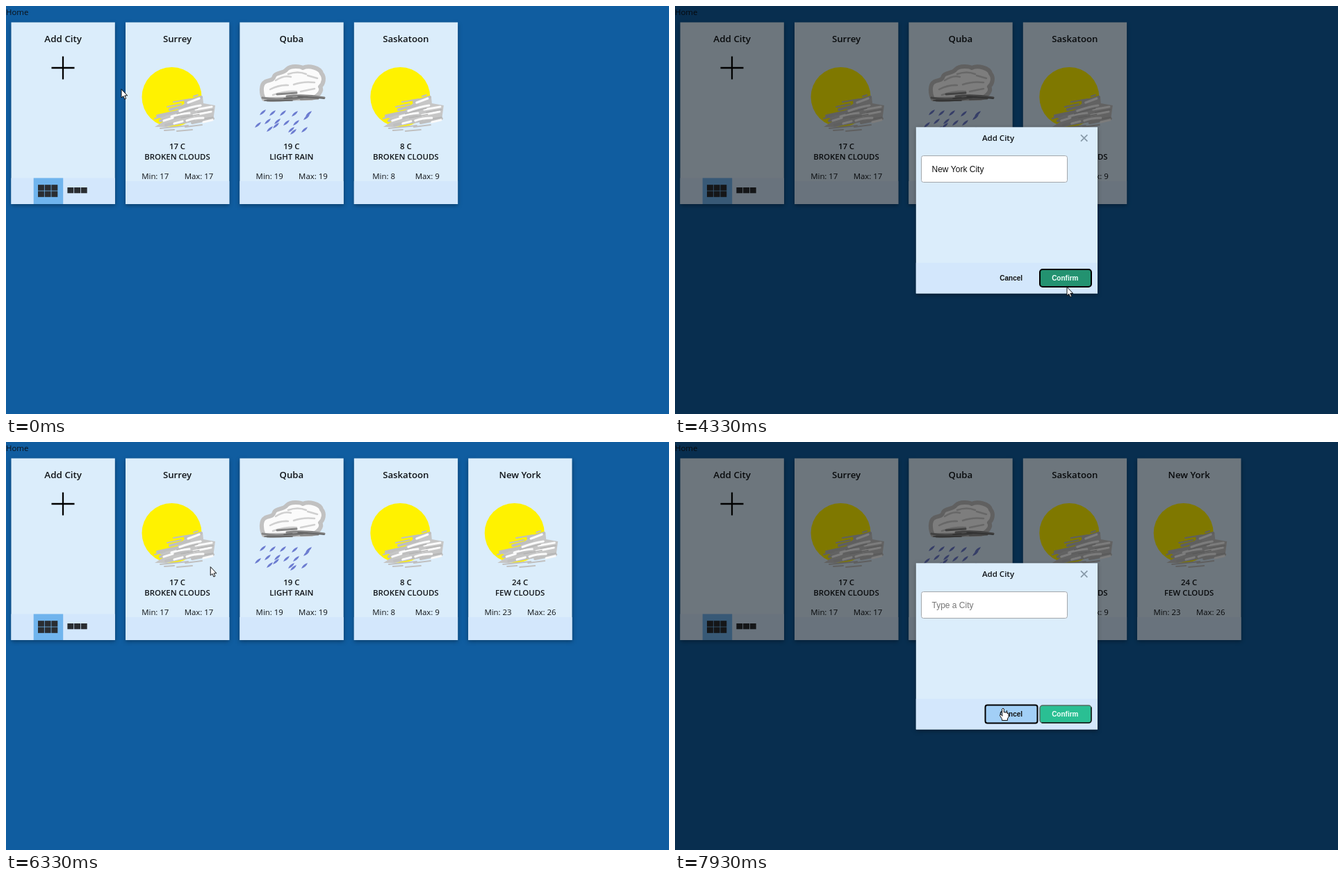
These frames come from a looping animation (954 px wide and 587 px high, 8000 ms). An HTML page with a canvas:

```html
<!DOCTYPE html>
<html lang="en">
<head>
<meta charset="utf-8">
<title>Weather cards</title>
<style>
  html, body { margin: 0; height: 100%; overflow: hidden; background: #105da0; }
  canvas { display: block; }
</style>
</head>
<body>
<canvas id="stage" width="954" height="587"></canvas>
<script>
const ctx = document.getElementById('stage').getContext('2d');
const TICKS = 120, TICKS_PER_MS = 15 / 1000;
const UI = '"Open Sans", "Noto Sans", sans-serif';
const ARIAL = '"Liberation Sans", Arial, sans-serif';
const PANEL = '#dbedfb', FOOTER = '#d3e7fc', HOVER = '#a2cff6';

const PLUS = [58.5, 69.5, 47, 41];
const INPUT = [354.5, 215.5, 210, 38];
const CANCEL = [446.5, 378.5, 75, 26];
const CONFIRM = [525, 379, 74, 25];
const ROW_HEIGHT = 28.75;

const cities = [
  { name: 'Surrey', temp: 17, sky: 'BROKEN CLOUDS', min: 17, max: 17 },
  { name: 'Quba', temp: 19, sky: 'LIGHT RAIN', min: 19, max: 19 },
  { name: 'Saskatoon', temp: 8, sky: 'BROKEN CLOUDS', min: 8, max: 9 },
  { name: 'New York', temp: 24, sky: 'FEW CLOUDS', min: 23, max: 26 },
];

// Pointer waypoints: tick, x, y
const route = [
  [1, 166, 120], [8, 95, 92], [12, 95, 92], [17, 372, 262], [20, 436, 243],
  [51, 436, 243], [54, 438, 268], [55, 438, 268], [60, 563, 402], [64, 563, 402],
  [65, 564, 404.6], [74, 400, 300], [81, 400, 300], [88, 103, 76], [90, 103, 76],
  [94, 300, 177], [98, 263, 196], [102, 263, 196], [110, 96, 91], [113, 96, 91],
  [118, 472, 383], [120, 472, 383],
];

// Typed text by tick
const typing = [
  [0, ''], [28, 'n'], [31, 'ne'], [33, 'new '], [36, 'new y'], [37, 'new yo'],
  [41, 'new yor'], [44, 'new york'], [55, 'New York City'], [66, ''],
];

// Suggestions by tick
const suggestions = [
  [0, []],
  [29, ['Nanchang', 'Nairobi', 'Nagoya', 'Naples']],
  [31, ['Neuquen', 'New Delhi', 'Newcastle', 'Netanya']],
  [33, ['New Delhi', 'Newcastle', 'New Orleans', 'New York City']],
  [36, ['New Yekepa', 'New York City']],
  [37, ['New York City']],
  [55, []],
];

const during = (tick, ...spans) => spans.some(([from, to]) => tick >= from && tick < to);
const latest = (list, tick) => list.filter(([from]) => tick >= from).pop()[1];
const inside = ([px, py], [x, y, w, h]) => px >= x && px <= x + w && py >= y && py <= y + h;

function pointerAt(tick) {
  const next = route.findIndex(([at]) => at > tick);
  if (next === 0) return route[0].slice(1);
  const [t0, x0, y0] = route[next - 1], [t1, x1, y1] = route[next];
  const p = (tick - t0) / (t1 - t0), ease = p * p * (3 - 2 * p);
  return [x0 + (x1 - x0) * ease, y0 + (y1 - y0) * ease];
}

function rect(x, y, w, h, color) {
  ctx.fillStyle = color;
  ctx.fillRect(x, y, w, h);
}

function box([x, y, w, h], radius, fill, line, width = 1) {
  ctx.beginPath();
  ctx.roundRect(x, y, w, h, radius);
  if (fill) { ctx.fillStyle = fill; ctx.fill(); }
  if (line) { ctx.strokeStyle = line; ctx.lineWidth = width; ctx.stroke(); }
}

function text(str, x, y, font, color = '#101418', align = 'center') {
  ctx.font = font;
  ctx.fillStyle = color;
  ctx.textAlign = align;
  ctx.fillText(str, x, y);
}

function stroke(path, color, width, cap = 'round') {
  ctx.strokeStyle = color;
  ctx.lineWidth = width;
  ctx.lineCap = cap;
  ctx.lineJoin = 'round';
  ctx.stroke(new Path2D(path));
}

function fill(path, color) {
  ctx.fillStyle = color;
  ctx.fill(new Path2D(path));
}

function panel(x, y, w, h, footerHeight) {
  ctx.save();
  ctx.shadowColor = 'rgba(0,0,0,.35)';
  ctx.shadowBlur = 6;
  ctx.shadowOffsetY = 2;
  rect(x, y, w, h, PANEL);
  ctx.restore();
  rect(x, y + h - footerHeight, w, footerHeight, FOOTER);
}

function sunIcon() {
  ctx.beginPath();
  ctx.arc(238.5, 131, 43, 0, 7);
  ctx.fillStyle = '#fff200';
  ctx.fill();
  fill('M218 159L246 150L262 135L283 130L284 140L301 143L298 165L268 167L230 174L214 174L228 165Z', '#c6c6c6');
  stroke('M218 158l28-6M236 149l28-7M258 138l23-7M222 165l40-8M230 171l40-7M268 168l30-6', '#bfbfbf', 4);
  stroke('M214 162l14-4M232 145l20-4M241 138l24-4M222 176l40-4M228 179l14-1M246 180l22-2M258 174l24-3M270 130l6-2', '#c0c0c0', 2);
  stroke('M250 151q16-6 30-8M262 139l16-6M273 149l23-4M238 159q12-4 26-5M270 157l25-5M260 165q10-4 24-4M284 167l13-3M227 165l13-4M242 169l12-3', '#fafafa', 3.2);
  stroke('M246 155l30-8M276 153l22-4M252 161l26-5M286 162l12-2', '#b4b4b4', 1.5);
}

function rainIcon() {
  const cloud = 'M371 134C367 126 366 113 373 109C379 106 384 108 386 101C388 95 399 98 404 91C410 85 424 87 427 89C436 85 452 89 454 97C459 103 457 112 452 116C456 122 449 130 440 133Z';
  fill(cloud, '#fbfbfb');
  stroke(cloud, '#c1c1c1', 6);
  stroke('M388 107q12-8 22-5M406 98q14-5 26 0M434 100l14 4M380 120q14-7 26-6M414 113q14-5 30-3M384 128q18-6 34-5M424 123l20-4', '#d0d0d0', 2.5);
  stroke('M369 132q20 4 42 0M376 136q26 1 50-4M404 130q26-3 54 2M390 127l28-2M424 134l25-1', '#858585', 3);
  stroke('M372 136l40 0M420 130l38 3M400 133l34-2', '#606060', 1.5);
  const drops = [
    [370, 153], [384, 154], [399, 154], [416, 155], [436, 155], [433, 160], [363, 171],
    [377, 166], [391, 166], [404, 168], [418, 168], [380, 177], [389, 172], [411, 178], [414, 181], [430, 178],
  ];
  for (const [x, y] of drops)
    fill(`M${x - 5} ${y + 4}Q${x - 3} ${y - 2} ${x + 4} ${y - 4}Q${x + 2} ${y + 2} ${x - 5} ${y + 4}Z`, '#6c7cd0');
}

function cityCard(city, index) {
  const shift = index * 164.4, center = 246.5 + shift;
  panel(172 + shift, 23.5, 149.3, 261.5, 33);
  text(city.name, center, 52, `600 13.2px ${UI}`);
  ctx.save();
  if (city.sky === 'LIGHT RAIN') {
    rainIcon();
  } else {
    ctx.translate(shift, 0);
    sunIcon();
  }
  ctx.restore();
  text(`${city.temp} C`, center, 206, `600 11.4px ${UI}`);
  text(city.sky, center, 221, `600 11.4px ${UI}`);
  text(`Min: ${city.min}`, center - 31.7, 249, `11.4px ${UI}`);
  text(`Max: ${city.max}`, center + 31, 249, `11.4px ${UI}`);
}

function addCard(hover, focus) {
  panel(7.5, 23.5, 149.3, 261.5, 37.5);
  text('Add City', 82.2, 52, `600 13.4px ${UI}`);
  if (hover) box(PLUS, 3, HOVER);
  if (focus) box(PLUS, 3, null, '#000', 2);
  stroke('M65.5 89H98.5M82 72.5V105.5', '#000', 2.3, 'butt');
  rect(39.7, 247.5, 42.5, 37.5, '#70b4ed');
  for (let col = 0; col < 3; col++) {
    for (const y of [257.2, 266.4]) rect(46 + col * 9.7, y, 8.9, 8.4, '#2a2d31');
    rect(88.4 + col * 9.7, 261, 8.9, 8.3, '#2a2d31');
  }
}

function dialog(tick, pointer, focus) {
  rect(0, 0, 954, 587, 'rgba(0,0,0,.5)');
  panel(346.8, 174.3, 261.2, 239.2, 44);
  text('Add City', 465, 194.3, `600 11.5px ${UI}`);
  stroke('M584 185.3l9.4 9.4M593.4 185.3l-9.4 9.4', '#8799a8', 1.7, 'butt');

  const value = latest(typing, tick), rows = latest(suggestions, tick);
  box(INPUT, 3, '#fff', '#a3a7ab');
  text(value || 'Type a City', 369.5, 238.5, `12px ${ARIAL}`, value ? '#111' : '#757575', 'left');
  if (during(tick, [20, 55])) {
    ctx.font = `12px ${ARIAL}`;
    rect(Math.round(369.5 + ctx.measureText(value).width), 228, 1, 13, '#000');
  }
  if (rows.length) {
    box([354.5, 254.5, 210, rows.length * ROW_HEIGHT], 0, '#fff', '#9a9ea2');
    rows.forEach((row, i) => {
      const area = [355, 255 + i * ROW_HEIGHT, 209, ROW_HEIGHT - 1];
      if (inside(pointer, area)) rect(...area, '#e9e9e9');
      text(row, 369.5, 273 + i * ROW_HEIGHT, `12px ${ARIAL}`, '#111', 'left');
    });
  }

  if (inside(pointer, CANCEL)) box(CANCEL, 3, HOVER);
  if (focus === 'cancel') box(CANCEL, 3, null, '#000', 2);
  text('Cancel', 483.7, 395, `bold 10px ${ARIAL}`, '#111');

  const active = focus === 'confirm';
  box(CONFIRM, 4, active || inside(pointer, CONFIRM) ? '#239270' : '#2abf93', active ? '#000' : '#56695f', active ? 2 : 1.4);
  if (!active) stroke('M599 382V400Q599 404 595 404H528', '#0c1d18', 1.5);
  text('Confirm', 561.3, 395, `bold 10px ${ARIAL}`, '#effffa');
}

function drawPointer([x, y], shape) {
  ctx.save();
  ctx.translate(x, y);
  if (shape === 'beam') {
    stroke('M-2.5-5.5H-.5L.5-5L1.5-5.5H3.5M.5-5V5M-2.5 5.5H-.5L.5 5L1.5 5.5H3.5', '#000', 1, 'butt');
  } else {
    const outline = shape === 'hand'
      ? 'M-1.3 1Q0-.8 1.3 1V6Q3.5 5 4 6.7Q6-.2 6 7.5Q7.8 6.5 8 9V12.5L6.5 15V17.5H-1.5V15.5L-4.6 10.5Q-4.5 8-2.5 9.5L-1.3 11Z'
      : 'M0 0V12L2.8 9.6L4.7 14L6.7 13.1L4.8 8.9H8.3Z';
    fill(outline, '#fff');
    stroke(outline, '#111', 1);
  }
  ctx.restore();
}

function draw(tick) {
  const pointer = pointerAt(tick);
  const open = during(tick, [11, 66], [90, 94], [113, TICKS]);
  const plusHover = !open && inside(pointer, PLUS);
  const plusFocus = during(tick, [10, 20], [89, 94], [112, 119]);
  const focus = during(tick, [64, 66]) ? 'confirm' : tick >= 119 ? 'cancel' : '';

  rect(0, 0, 954, 587, '#105da0');
  text('Home', 0, 13, `11.4px ${UI}`, '#0b1016', 'left');
  addCard(plusHover, plusFocus);
  cities.slice(0, tick >= 69 ? 4 : 3).forEach(cityCard);
  if (open) dialog(tick, pointer, focus);

  const onRow = open && during(tick, [29, 55]) && pointer[1] > 254;
  const onButton = plusHover || onRow || open && (inside(pointer, CANCEL) || inside(pointer, CONFIRM));
  drawPointer(pointer, onButton ? 'hand' : open && inside(pointer, INPUT) ? 'beam' : 'arrow');
}

// The picture advances in whole ticks; the small lead absorbs rounded timestamps.
const start = performance.now();
function loop() {
  const elapsed = performance.now() - start;
  draw(Math.floor((elapsed + 4) * TICKS_PER_MS) % TICKS);
  requestAnimationFrame(loop);
}
loop();
</script>
</body>
</html>
```
